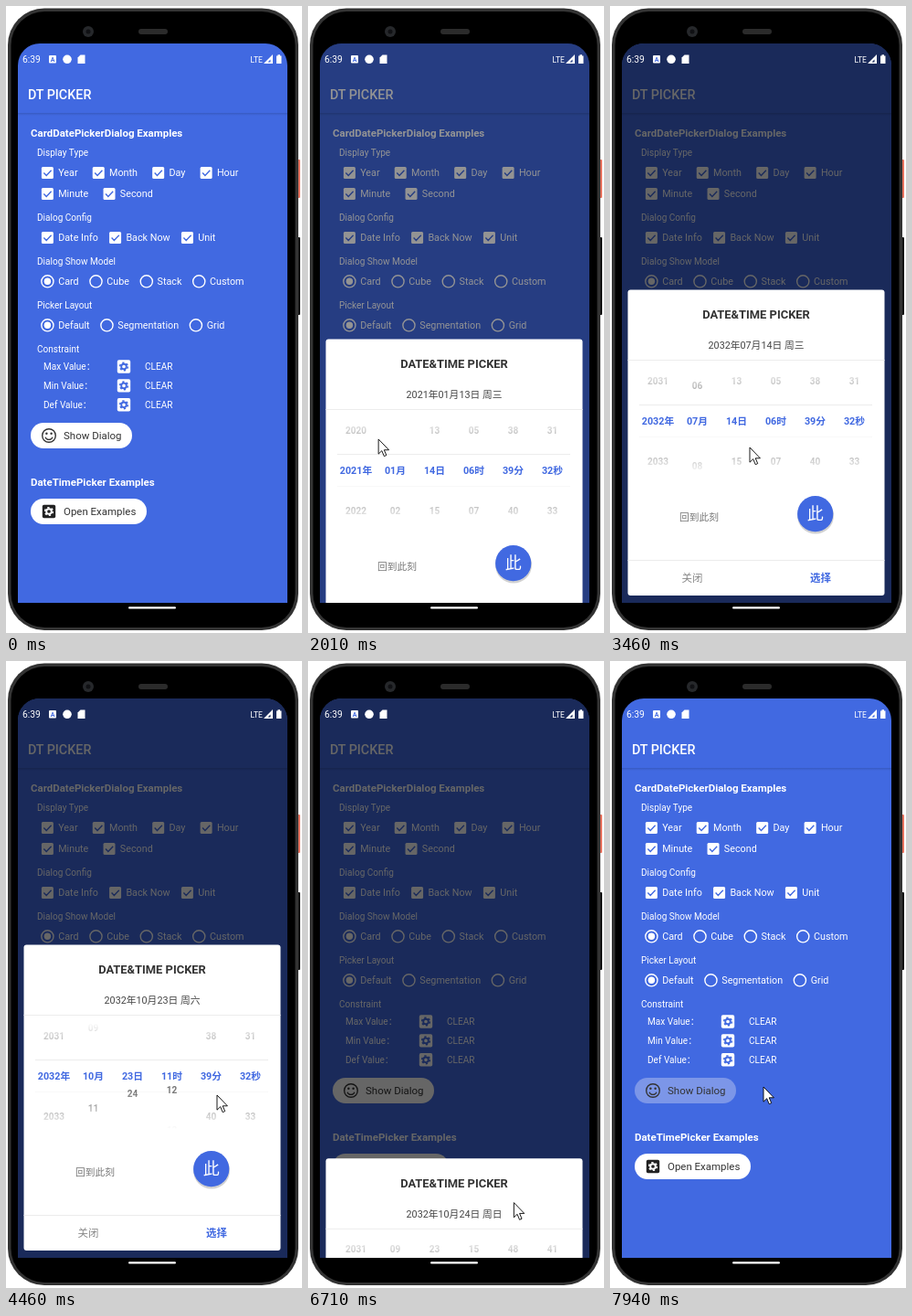
An HTML page that plays this animation: 324x686 px, repeating every 8000 ms.

```html
<!DOCTYPE html>
<html lang="zh-CN">
<head>
<meta charset="utf-8">
<style>
html, body { margin: 0; width: 100%; height: 100%; overflow: hidden; background: #fff }
svg { display: block; width: 324px; height: 686px; font: 10.05px Roboto, "Noto Sans CJK SC", "Noto Sans CJK", sans-serif }
.mid { text-anchor: middle }
</style>
</head>
<body>
<svg viewBox="0 0 324 686">
  <defs>
    <clipPath id="screen"><path d="M13 653V65a24 24 0 0 1 24-24H284a24 24 0 0 1 24 24V653z"/></clipPath>
    <linearGradient id="fade" gradientUnits="userSpaceOnUse" x1="0" y1="396" x2="0" y2="512">
      <stop stop-color="#000"/><stop offset=".36" stop-color="#fff"/>
      <stop offset=".64" stop-color="#fff"/><stop offset="1" stop-color="#000"/>
    </linearGradient>
    <mask id="edges" maskUnits="userSpaceOnUse" x="20" y="388" width="281" height="132">
      <rect x="20" y="388" width="281" height="132" fill="url(#fade)"/>
    </mask>
    <linearGradient id="shade" x2="0" y2="1"><stop stop-opacity=".14"/><stop offset="1" stop-opacity="0"/></linearGradient>
  </defs>

  <rect x="318" y="168" width="4" height="42" rx="1" fill="#e8735f"/>
  <rect x="318" y="253" width="4" height="85" rx="1" fill="#111"/>
  <rect x="2" y="2.5" width="318" height="680.5" rx="40" fill="#333"/>
  <rect x="5.5" y="6" width="311" height="674" rx="37"/>
  <circle cx="90" cy="28" r="6" fill="#26282b"/><circle cx="90" cy="28" r="2.5" fill="#101114"/>
  <rect x="145" y="25" width="32" height="6" rx="3" fill="#2b2b2b"/>
  <rect x="134" y="657.3" width="52" height="2.2" rx="1.1" fill="#fff"/>

  <g clip-path="url(#screen)">
    <rect x="13" y="41" width="295" height="612" fill="#4169e1"/>
    <rect x="13" y="117" width="295" height="3" fill="url(#shade)"/>
    <g id="form" fill="#fff"></g>
    <rect id="dim" x="13" y="41" width="295" height="612"/>
    <g fill="#fff">
      <text x="18" y="62" font-size="10.3">6:39</text>
      <rect x="47" y="54" width="8" height="8.5" rx="1"/>
      <text x="51" y="61" class="mid" font-size="7" font-weight="700" fill="#4169e1">A</text>
      <circle cx="67" cy="58.3" r="4.8"/>
      <path d="M81.5 53.5H86.5V63H78.5V56.5z"/>
      <text x="267.5" y="62" font-size="8.6">LTE</text>
      <path d="M292 53V63H282zM289.5 58.5l-3 3h3z" fill-rule="evenodd"/>
      <path d="M296 54.5h1.5v-1.3h2.5v1.3h1.5V63H296z"/>
    </g>
    <g id="sheet">
      <rect x="19.5" y="310.5" width="281" height="334.5" rx="3" fill="#fff"/>
      <path d="M19.5 387.5H300.5M32 436.5H287M19.5 606.5H300.5" stroke="#ececec"/>
      <path d="M32 471.5H287" stroke="#f8f8f8"/>
      <g class="mid" font-size="10.77">
        <text x="160" y="342" font-size="12.92" font-weight="700" fill="#333">DATE&amp;TIME PICKER</text>
        <text id="date" x="160" y="375" fill="#444"></text>
        <g id="wheels" mask="url(#edges)" font-weight="700"></g>
        <text x="97.5" y="563" fill="#777">回到此刻</text>
        <circle cx="225" cy="557.5" r="20" opacity=".18"/>
        <circle cx="224.7" cy="555.7" r="19.6" fill="#4169e1"/>
        <text x="224.7" y="562.3" font-size="18" fill="#fff">此</text>
        <g font-size="11.48">
          <text x="90" y="630" fill="#888">关闭</text>
          <text x="230.5" y="630" font-weight="700" fill="#4169e1">选择</text>
        </g>
      </g>
    </g>
  </g>
  <path id="cursor" d="M0 0V16.2L3.7 12.7L6.2 18.7L8.7 17.6L6.2 11.8H11.4z" fill="#fff" stroke="#000" stroke-width=".9"/>
</svg>

<script>
const $ = id => document.getElementById(id);
const BLUE = '#4169e1', INK = '#333';
const ramp = (t, a, b) => Math.max(0, Math.min(1, (t - a) / (b - a)));
const easeOut = p => 1 - (1 - p) ** 3;
const smooth = p => p * p * (3 - 2 * p);
const mix = (a, b, p) => a + (b - a) * p;
const pad = n => String(n).padStart(2, '0');

// Form
const SMALL = 10.05, BODY = 10.77, LARGE = 11.48;
const pen = document.createElement('canvas').getContext('2d');
pen.font = BODY + 'px Roboto, sans-serif';

const text = (x, y, s, size = SMALL, more = '') =>
  `<text x="${x}" y="${y}" font-size="${size}" ${more}>${s}</text>`;
const box = (x, y, w, h, r, more = '') =>
  `<rect x="${x}" y="${y}" width="${w}" height="${h}" rx="${r}" ${more}/>`;
const ring = (x, y, r, color, width, more = '') =>
  `<circle cx="${x}" cy="${y}" r="${r}" fill="none" stroke="${color}" stroke-width="${width}" ${more}/>`;
const dot = (x, y, r) => `<circle cx="${x}" cy="${y}" r="${r}"/>`;

const check = (x, y) => box(x - 6.5, y - 6.5, 13, 13, 1.5) +
  `<path d="M${x - 4} ${y}l2.8 2.9 5.4-5.6" fill="none" stroke="${BLUE}" stroke-width="1.4"/>`;
const radio = (x, y, on) => ring(x, y, 6.6, '#fff', 1.4) + (on ? dot(x, y, 3.7) : '');
const gear = (x, y, back, front) => box(x - 7.2, y - 7.2, 14.4, 14.4, 1.8, `fill="${back}"`) +
  ring(x, y, 2.8, front, 1.9) + ring(x, y, 4.3, front, 1.6, 'stroke-dasharray="2.25"');
const smiley = (x, y) => ring(x, y, 7.3, INK, 1.4) +
  `<g fill="${INK}">${dot(x - 2.6, y - 2.2, 1.2)}${dot(x + 2.6, y - 2.2, 1.2)}</g>` +
  `<path d="M${x - 4} ${y + 1.7}a4.3 4.3 0 0 0 8 0" fill="none" stroke="${INK}" stroke-width="1.3"/>`;

// Options follow each other, spaced by the width of their labels
function row(y, mark, gap, ...labels) {
  let x = 45.4;
  return labels.map((s, i) => {
    const out = mark(x, y, !i) + text(x + 11.8, y + 3.9, s, BODY);
    x += pen.measureText(s).width + gap;
    return out;
  }).join('');
}
const heading = (y, s) => text(27, y, s, LARGE, 'font-weight="700"');
const label = (y, s) => text(34, y, s);
const limit = (y, s) =>
  text(41, y + 3.6, s + ' Value：') + gear(129, y, '#fff', BLUE) + text(152, y + 3.6, 'CLEAR');
const chip = (y, w, id, icon, s) =>
  box(27, y - 14, w, 28, 14, `id="${id}"`) + icon + text(63, y + 4, s, LARGE, `fill="${INK}"`);

$('form').innerHTML = [
  text(24, 102, 'DT PICKER', 14.35, 'font-weight="500"'),
  heading(143, 'CardDatePickerDialog Examples'),
  label(164, 'Display Type'),
  row(182.5, check, 34.5, 'Year', 'Month', 'Day', 'Hour'),
  row(205.5, check, 34.5, 'Minute', 'Second'),
  label(234.5, 'Dialog Config'),
  row(253.5, check, 30.6, 'Date Info', 'Back Now', 'Unit'),
  label(283, 'Dialog Show Model'),
  row(301.3, radio, 30.6, 'Card', 'Cube', 'Stack', 'Custom'),
  label(331, 'Picker Layout'),
  row(349.3, radio, 30.6, 'Default', 'Segmentation', 'Grid'),
  label(378.7, 'Constraint'),
  ...['Max', 'Min', 'Def'].map((s, i) => limit(394.5 + 20.9 * i, s)),
  chip(470, 111, 'show', smiley(47, 470), 'Show Dialog'),
  heading(524.5, 'DateTimePicker Examples'),
  chip(553, 127, 'open', gear(47, 553, '#222', '#fff'), 'Open Examples'),
].join('');

// Wheels are flung one after another, coast, then snap to a whole value
const ROW = 44;
const wheels = [
  ['年', 2021, 2032, 1000],
  ['月', 1, 10.2, 1430],
  ['日', 14, 23.57, 930],
  ['时', 6, 16, 1700],
  ['分', 39, 48.86, 1500],
  ['秒', 32, 41.73, 1000],
].map(([unit, from, to, time], i) => ({ unit, from, to, start: 2550 + 500 * i, time, x: 52.5 + 43 * i }));

const position = (w, t) => {
  const end = w.start + w.time;
  const coast = mix(w.from, w.to, easeOut(ramp(t, w.start, end)));
  return mix(coast, Math.round(w.to), ramp(t, end, end + 150));
};
const chosen = pos => Math.floor(pos + .2);

function wheel(w, t) {
  const pos = position(w, t), sel = chosen(pos);
  let out = text(w.x, 457.8, pad(sel) + w.unit, BODY, `fill="${BLUE}"`);
  for (let n = Math.max(1, sel - 2); n <= sel + 2; n++)
    if (n != sel) out += text(w.x, 457.6 + (n - pos) * ROW, pad(n), SMALL, 'fill="#777"');
  return out;
}

// Cursor stops: [time, x, y]; each wheel adds an upward swipe
const stops = [
  [0, 275, 690], [700, 43, 205], [900, 57, 180], [1600, 79, 459],
  ...wheels.flatMap(({ start }, i) => {
    const x = 75 + 39 * i, y = 491 - 4 * i;
    return [[start - 90, x, y], [start + 200, x - 4, y - 60]];
  }),
  [5500, 280, 540], [5750, 270, 365], [6010, 212, 437], [6500, 229, 618],
  [6760, 225, 590], [7190, 225, 590], [7650, 98, 469], [7860, 137, 467], [7940, 168, 466],
];

function cursor(t) {
  const i = stops.findIndex(s => s[0] > t);
  if (i < 0) return stops[stops.length - 1].slice(1);
  const a = stops[i - 1], b = stops[i], p = smooth(ramp(t, a[0], b[0]));
  return [mix(a[1], b[1], p), mix(a[2], b[2], p)];
}

function draw(t) {
  $('wheels').innerHTML = wheels.map(w => wheel(w, t)).join('');
  const [y, m, d] = wheels.map(w => chosen(position(w, t)));
  const day = t < wheels[0].start ? d - 1 : d; // the heading updates on first touch
  $('date').textContent = `${y}年${pad(m)}月${pad(day)}日 周${'日一二三四五六'[new Date(y, m - 1, day).getDay()]}`;

  const up = easeOut(ramp(t, 1850, 2200)) - easeOut(ramp(t, 6600, 6950));
  $('sheet').setAttribute('transform', `translate(0 ${343 * (1 - up)})`);
  $('dim').setAttribute('opacity', .6 * (ramp(t, 1800, 2100) - ramp(t, 7070, 7370)));
  $('show').setAttribute('fill', t > 1700 && t < 2000 || t > 7650 ? '#7c96e8' : '#fff');
  $('cursor').setAttribute('transform', `translate(${cursor(t)})`);
}

function loop() {
  draw(performance.now() % 8000);
  requestAnimationFrame(loop);
}
loop();
</script>
</body>
</html>
```
